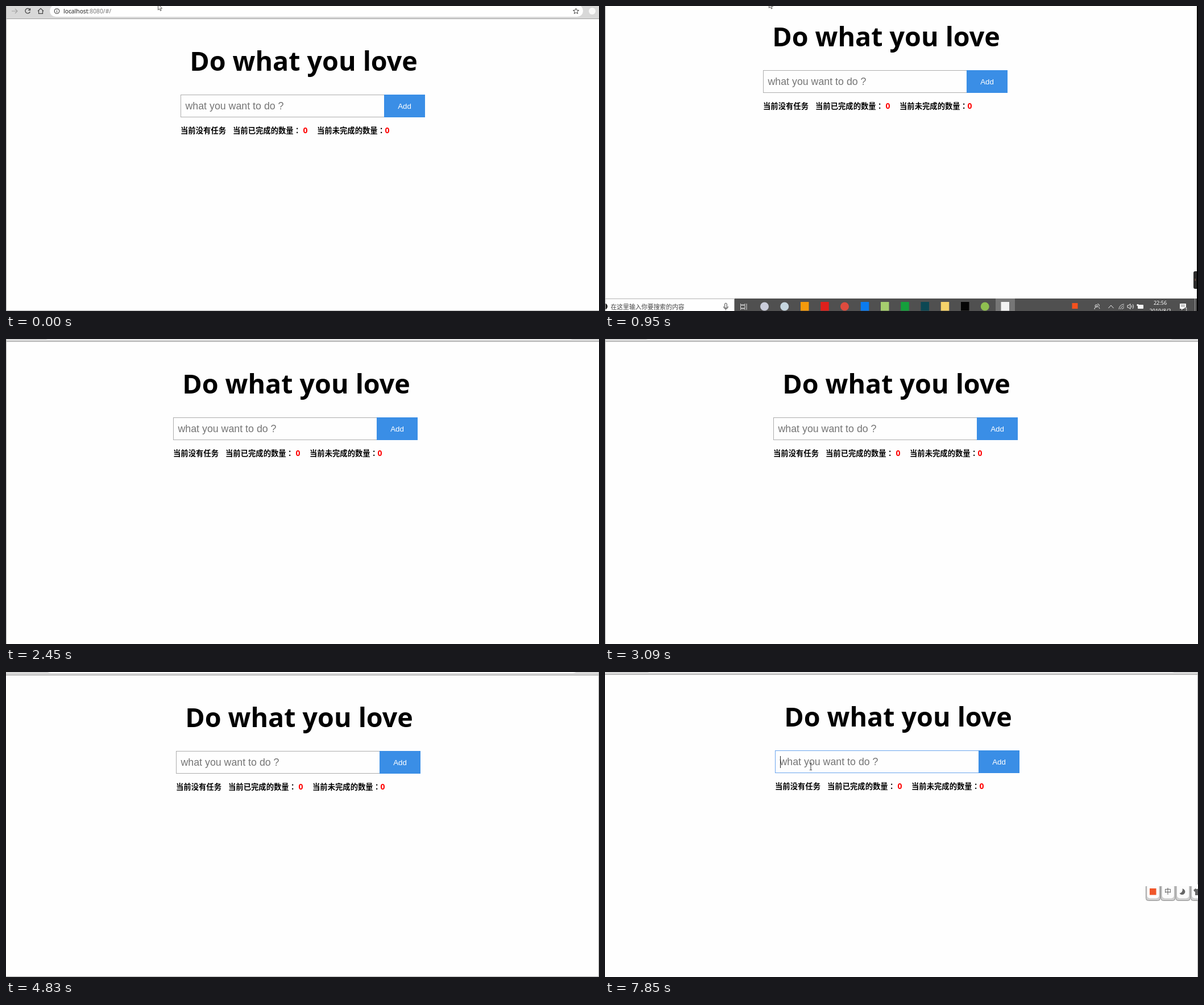
Recreate the animation shown at these times as an HTML page with a canvas. Size 1043 by 537 pixels, loop 8 s.

```html
<!DOCTYPE html>
<html lang="zh-CN">
<head>
<meta charset="utf-8">
<title>Do what you love</title>
<style>
  html, body { margin: 0; width: 100%; height: 100%; overflow: hidden; background: #fefefe; }
  canvas { display: block; }
</style>
</head>
<body>
<canvas id="stage" width="1043" height="537"></canvas>
<script>
const W = 1043, H = 537, LOOP = 8000;
const g = document.getElementById('stage').getContext('2d');

const LATIN = '"Noto Sans", "Open Sans", sans-serif';
const ARIAL = '"Liberation Sans", sans-serif';
const CJK = '"Noto Sans CJK SC", "Noto Sans CJK", sans-serif';
const CJK_CENTERED = '"Noto Sans CJK TC", "Noto Sans CJK", sans-serif';

// Recorder viewport: x, y locate the input box; edges are the frame lines seen on the stage.
const views = [
  { t: 0,    x: 307, y: 156, edges: 'LB', arrow: [267.5, -3.5] },
  { t: 150,  x: 307, y: 156, edges: 'LB' },
  { t: 810,  x: 292, y: 134, edges: 'L' },
  { t: 950,  x: 278, y: 113, edges: 'L', arrow: [288.5, -7] },
  { t: 1470, x: 307, y: 122, edges: '' },
  { t: 1890, x: 336, y: 131, edges: '' },
  { t: 2260, x: 334, y: 131, edges: '' },
  { t: 2450, x: 294, y: 138, edges: 'L' },
  { t: 3090, x: 296, y: 138, edges: 'L' },
  { t: 3510, x: 293, y: 135, edges: 'L' },
  { t: 3730, x: 291, y: 132, edges: 'R', arrow: [273.5, -11.5] },
  { t: 4290, x: 295, y: 136, edges: 'R' },
  { t: 4830, x: 299, y: 139, edges: 'RB' },
  { t: 5230, x: 299, y: 138, edges: 'R', beam: [330, 150] },
  { t: 5420, x: 299, y: 138, edges: 'R', beam: [362, 160] }
];
const FOCUS_AT = 5830, IME_SWITCH_AT = 7570;
const caretToggles = [5830, 6240, 6700, 7290, 7850];

function rect(x, y, w, h, color) {
  g.fillStyle = color;
  g.fillRect(x, y, w, h);
}
function disc(x, y, r, color) {
  g.fillStyle = color;
  g.beginPath();
  g.arc(x, y, r, 0, 7);
  g.fill();
}
function rounded(x, y, w, h, r, fill, stroke) {
  g.beginPath();
  g.roundRect(x, y, w, h, r);
  g.fillStyle = fill;
  g.fill();
  if (stroke) { g.strokeStyle = stroke; g.lineWidth = 1; g.stroke(); }
}
function path(d, x, y, color, width = 1, fill) {
  g.save();
  g.translate(x, y);
  const p = new Path2D(d);
  if (fill) { g.fillStyle = fill; g.fill(p); }
  if (color) { g.strokeStyle = color; g.lineWidth = width; g.stroke(p); }
  g.restore();
}
function text(s, x, y, font, color, align = 'left') {
  g.font = font;
  g.fillStyle = color;
  g.textAlign = align;
  g.fillText(s, x, y);
  return x + g.measureText(s).width;
}

// Everything on the desktop is placed relative to the input box.
function drawToolbar() {
  rect(-330, -300, 1100, 166, '#d8d8d8');
  rect(-330, -134, 1100, 1, '#a0a0a0');
  rounded(-230, -158, 938, 21, 10.5, '#fefefe');
  path('M-5 0H5M1 -4L5 0L1 4', -292, -147, '#a3a3a3', 1.2);
  path('M4 -2.5A4.3 4.3 0 1 0 4.3 1M4.5 -5V-1.6H1', -269, -147, '#444', 1.3);
  path('M-5 0L0 -4.6L5 0M-3.5 -1V4.3H3.5V-1', -246, -147, '#444', 1.2);
  path('M-4.3 0A4.3 4.3 0 1 0 4.3 0A4.3 4.3 0 1 0 -4.3 0M0 -2.5V-1.3M0 -.5V2.5', -217.5, -147, '#444', 1.1);
  const font = '10.3px ' + LATIN;
  const end = text('localhost', -206, -143.3, font, '#222');
  text(':8080/#/', end, -143.3, font, '#777');
  path('M0 -5L1.4 -1.7L5 -1.4L2.3 1L3.1 4.5L0 2.6L-3.1 4.5L-2.3 1L-5 -1.4L-1.4 -1.7Z', 695.5, -147, '#444', 1);
  disc(724, -147, 6, '#f8f8f8');
}

function drawCount(label, x, zeroX) {
  const end = text(label, x, 68, 'bold 13.33px ' + CJK, '#000');
  text('：', end, 68, 'bold 13.33px ' + CJK_CENTERED, '#000');
  text('0', zeroX, 68, 'bold 14px ' + LATIN, '#f00');
}

function drawPage(focused) {
  text('Do what you love', 216.5, -42, 'bold 46.6px ' + LATIN, '#000', 'center');
  g.strokeStyle = focused ? '#6aa5ee' : '#adadad';
  g.lineWidth = 1;
  g.strokeRect(.5, .5, 358, 39);
  text('what you want to do ?', 8.5, 26, '17.8px ' + ARIAL, '#757575');
  rect(358, 0, 72, 40, '#3a8ee6');
  text('Add', 394, 24.5, '13.33px ' + ARIAL, '#fff', 'center');
  text('当前没有任务', 0, 68, 'bold 13.33px ' + CJK, '#000');
  drawCount('当前已完成的数量', 92, 215.5);
  drawCount('当前未完成的数量', 240, 359.5);
}

function drawTaskbar() {
  const top = 402, mid = 416;
  rect(-330, top, 1094, 60, '#505050');
  rect(-295.5, top, 245, 60, '#fefefe');
  rect(-295.5, top, 245, 1, '#b5b5b5');
  disc(-279, mid, 5.5, '#222');
  text('在这里输入你要搜索的内容', -268, mid + 4.5, '10.8px ' + CJK, '#444');
  path('M-1.8 -4A1.8 1.8 0 0 1 1.8 -4V1A1.8 1.8 0 0 1 -1.8 1ZM-4 0A4 4 0 0 0 4 0M0 4V6.5', -65.5, mid, '#444', 1);
  path('M-5.5 -5V-3H2V-5M-5.5 6V4H2V6M-5.5 -2H2V3H-5.5ZM5 -5V6', -34, mid, '#ddd', 1);

  rect(409, top, 34, 60, '#767676');
  const icons = [
    ['o', '#c9ccda'], ['o', '#c5d5df'], ['s', '#f59a0b'], ['s', '#e0201b'], ['o', '#dd4b3e'],
    ['s', '#0b7bf0'], ['s', '#a6cf6e'], ['s', '#15a03c'], ['s', '#0d4854'], ['s', '#f5d26a'],
    ['s', '#050505'], ['o', '#8fbf50'], ['s', '#f2f2f2']
  ];
  icons.forEach(([shape, color], i) => {
    const x = 2.5 + i * 35.25;
    if (shape === 'o') disc(x, mid, 7.5, color);
    else rect(x - 7, mid - 8, 14.5, 15.5, color);
  });
  rect(543.5, mid - 6, 10, 10, '#f4511e');

  path('M-4 5A4 4 0 0 1 2 1M-3 -1A2 2 0 1 0 1 -1A2 2 0 1 0 -3 -1M1 -4A2 2 0 1 1 3 0M3 1A4 4 0 0 1 5 4', 587, mid, '#eee', 1);
  path('M-4.5 3L0 -2L4.5 3', 612, mid, '#eee', 1);
  path('M-4 5A9 9 0 0 1 5 -4M-1 5A6 6 0 0 1 5 -1M2 5A3 3 0 0 1 5 2', 630, mid, '#ddd', 1);
  path('M-5 -2H-3L0 -4.5V4.5L-3 2H-5ZM2 -2A3 3 0 0 1 2 2M4 -4A6 6 0 0 1 4 4', 646, mid, '#eee', 1);
  rounded(659, mid - 3, 10, 7, 1, '#f4f4f4');
  rect(657.5, mid - 4, 3, 3, '#f4f4f4');
  text('22:56', 698.5, 412.5, '9.1px ' + LATIN, '#fff', 'center');
  text('2019/8/2', 698.5, 426.5, '9.1px ' + LATIN, '#fff', 'center');
  path('M-6 -5H5V4H-1L-3 7V4H-6Z', 739, mid, null, 1, '#fff');
  path('M-4 -2.5H3M-4 0H3', 739, mid, '#777', 1);
  disc(744.5, mid + 6, 4.5, '#555');
  text('1', 744.5, mid + 9, '8px ' + LATIN, '#fff', 'center');
  rect(759, top, 1, 60, '#999');
}

function drawScreenEdges() {
  rounded(757, 354, 10, 31, 3, '#2b2b2b');
  rect(759.5, 367, 1.5, 4, '#775544');
  rect(-1000, -300, 670, 1000, '#000');
  rect(763, -300, 500, 1000, '#000');
}

function drawIme(chinese) {
  for (let i = 0; i < 4; i++) {
    const x = 951.5 + i * 26.3;
    rounded(x, 376.5, 25, 26, [1, 1, 4, 4], '#cfcfcf', '#8c8c8c');
    rounded(x + 2, 374.5, 21, 24, [0, 0, 5, 5], '#fcfcfc');
  }
  rect(951, 374, 92, 3, '#fefefe');
  rect(958, 381, 11.5, 11.5, '#f0572a');
  text(chinese ? '中' : '英', 990, 391.3, '12px ' + CJK, '#555', 'center');
  path('M0 -5A5.3 5.3 0 1 1 -5 3A6 6 0 0 0 0 -5Z', 1015.5, 386.5, null, 1, '#666');
  path('M-6 -3L-2.5 -6Q0 -3.5 2.5 -6L6 -3L4 0L3 -.5V6H-3V-.5L-4 0Z', 1041, 387, null, 1, '#666');
}

function drawEdges(edges) {
  const color = '#b0b0b0';
  if (edges.includes('L')) rect(0, 0, 1, H, color);
  if (edges.includes('R')) rect(W - 1, 0, 1, H, color);
  if (edges.includes('B')) rect(0, H - 1, W, 1, color);
}

function render(t) {
  const view = views.findLast(v => v.t <= t);
  const focused = t >= FOCUS_AT;
  rect(0, 0, W, H, '#fefefe');

  g.save();
  g.translate(view.x, view.y);
  drawToolbar();
  drawPage(focused);
  drawTaskbar();
  drawScreenEdges();
  g.restore();

  drawEdges(view.edges);
  if (focused) drawIme(t >= IME_SWITCH_AT);
  if (caretToggles.filter(c => c <= t).length % 2) rect(308, 148, 1, 21, '#222');
  if (view.arrow) path('M0 0V10.5L2.4 8.3L4 12L5.6 11.3L4.1 7.7H7Z', ...view.arrow, '#444', .9, '#fff');
  if (view.beam) path('M-2 .5H-.5L0 1L.5 .5H2M0 1V12M-2 12.5H-.5L0 12L.5 12.5H2', ...view.beam, '#333', 1);
}

function tick() {
  render(performance.now() % LOOP);
  requestAnimationFrame(tick);
}
tick();
</script>
</body>
</html>
```
